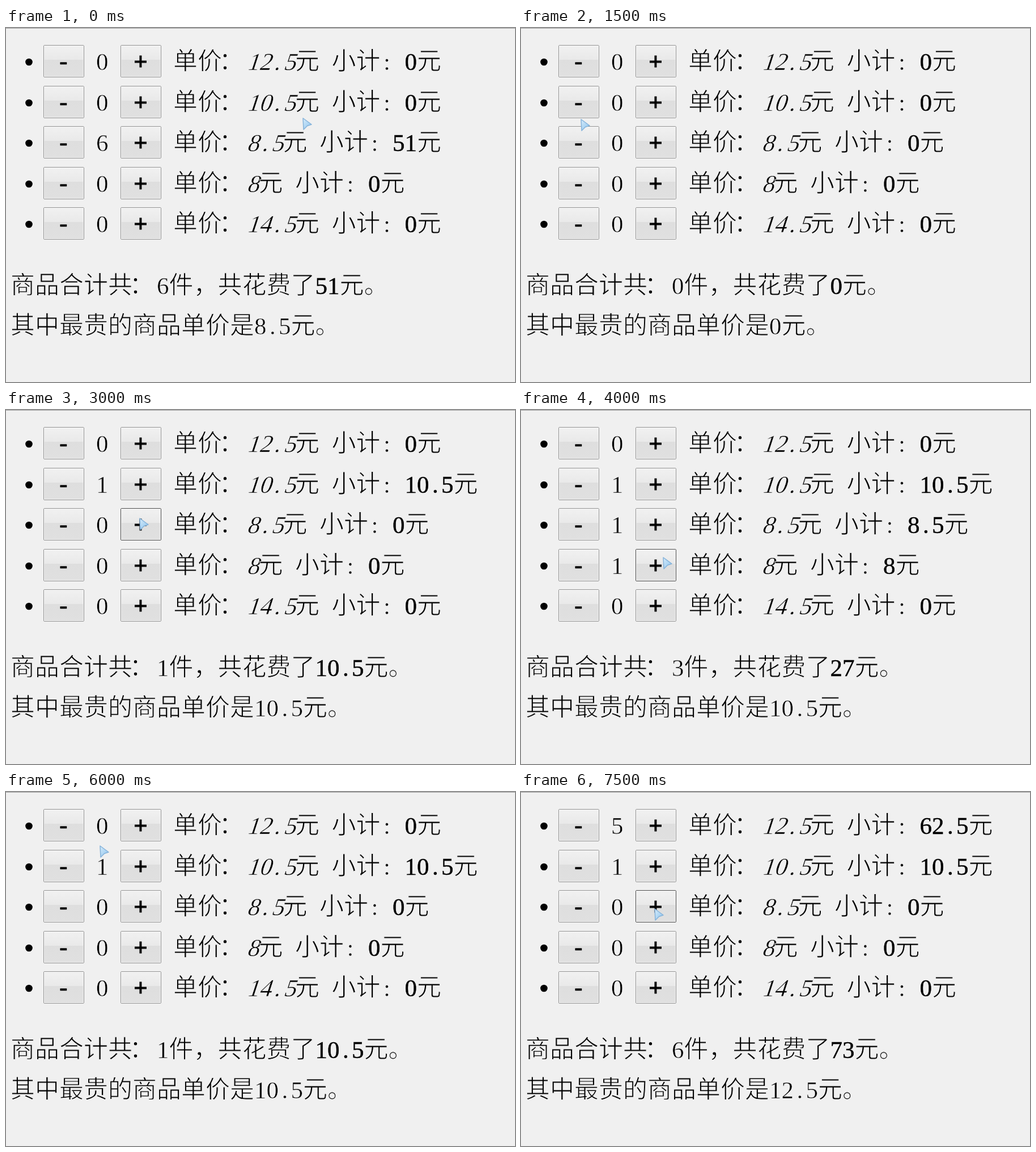
An HTML page for the animation above (8000 ms loop, 898 by 624 pixels).

```html
<!DOCTYPE html>
<html lang="zh-CN">
<head>
<meta charset="utf-8">
<style>
  html, body { margin: 0; width: 100%; height: 100%; overflow: hidden; background: #f0f0f0; }
  svg { display: block; width: 898px; height: 624px; }
  text { font: 43px "Liberation Serif", "Noto Sans CJK SC", "Noto Sans CJK", serif; white-space: pre; }
  /* a background-coloured outline thins the strokes */
  .latin { stroke: #f0f0f0; stroke-width: .6; }
  .han { stroke: #f0f0f0; stroke-width: 1.1; }
  .bold .latin { stroke: #000; stroke-width: .4; }
  .sign { font-family: "Liberation Sans", sans-serif; text-anchor: middle; stroke: #000; }
  .minus { font-size: 46px; stroke-width: .4; }
  .plus { font-size: 41px; stroke-width: 1; }
  .button { fill: url(#face); stroke: #939393; }
  .button.hover { stroke: #4c4c4c; }
</style>
</head>
<body>
<svg viewBox="0 0 898 624">
  <defs>
    <linearGradient id="face" x2="0" y2="1">
      <stop offset="0" stop-color="#f1f1f1"/>
      <stop offset=".46" stop-color="#e9e9e9"/>
      <stop offset=".46" stop-color="#dedede"/>
      <stop offset="1" stop-color="#e0e0e0"/>
    </linearGradient>
    <linearGradient id="glass" x2="1" y2="1">
      <stop offset="0" stop-color="#d5ebfa"/>
      <stop offset="1" stop-color="#8cc3ee"/>
    </linearGradient>
  </defs>
  <path d="M0 .5H898" stroke="#a0a0a0"/>
  <g id="fixed"></g>
  <g id="values"></g>
  <path id="cursor" d="M1 1L16 12L8.5 14.5L2 21Z" fill="url(#glass)" stroke="#86b3da" stroke-width="1.5" stroke-linejoin="round"/>
</svg>
<script>
const EM = 43, STEP = 500;
const prices = [12.5, 10.5, 8.5, 8, 14.5];

// quantities per row, then cursor tip
const steps = [
  ['00600', 523, 158], ['00600', 100, 55], ['00600', 104, 4], ['00000', 105, 160],
  ['00000', 105, 160], ['00000', 229, 152], ['01000', 235, 190], ['01100', 240, 252],
  ['01110', 250, 259], ['01111', 235, 338], ['01110', 90, 269], ['01100', 95, 200],
  ['01000', 165, 94], ['11000', 225, 55], ['31000', 225, 55], ['51000', 235, 205]
];

const $ = id => document.getElementById(id);
const fixed = $('fixed'), values = $('values'), cursor = $('cursor');
const rowTop = i => 30 + Math.round(71.6 * i);

function add(parent, tag, attrs, content = '') {
  const node = document.createElementNS('http://www.w3.org/2000/svg', tag);
  for (const key in attrs) node.setAttribute(key, attrs[key]);
  node.textContent = content;
  return parent.appendChild(node);
}

// Where punctuation sits inside its cell.
const nudge = { '.': EM / 8, ':': EM / 8, '：': -EM / 8 };

// Half-width cells for ASCII, full-width for the rest; returns the end position.
function write(parent, x, y, content, style = '') {
  const slant = style === 'slant' ? ' skewX(-18)' : '';
  const text = add(parent, 'text', { class: style, transform: `translate(${x} ${y})${slant}` });
  let end = 0;
  for (const run of String(content).match(/[ -~]+|[^ -~]+/g)) {
    const latin = run < '\u0080';
    const xs = [...run].map((char, i) => end + i * (latin ? EM / 2 : EM) + (nudge[char] || 0));
    add(text, 'tspan', { x: xs.join(' '), y: latin ? 0 : -1, class: latin ? 'latin' : 'han' }, run);
    end += run.length * (latin ? EM / 2 : EM);
  }
  return x + end;
}

// Pieces of [content, style] one after another.
function writeLine(parent, x, y, ...pieces) {
  for (const [content, style] of pieces) x = write(parent, x, y, content, style);
  return x;
}

const buttons = [];
const subtotalX = prices.map((price, i) => {
  const top = rowTop(i);
  add(fixed, 'circle', { cx: 40.5, cy: top + 30, r: 6.3 });
  for (const [x, sign, name, base] of [[66, '-', 'minus', 44.6], [202, '+', 'plus', 43]]) {
    const box = add(fixed, 'rect', { x: x + .5, y: top + .5, width: 71, height: 56, rx: 1.5, class: 'button' });
    add(fixed, 'rect', { x: x + 1.5, y: top + 1.5, width: 69, height: 54, fill: 'none', stroke: '#f8f8f8', 'stroke-opacity': .8 });
    add(fixed, 'text', { x: x + 35.5, y: top + base, class: 'sign ' + name }, sign);
    buttons.push({ box, x, top });
  }
  return writeLine(fixed, 295, top + 44, ['单价：'], [price, 'slant'], ['元 小计: ']);
});

function show([digits, x, y]) {
  const counts = [...digits].map(Number);
  const pieces = counts.reduce((a, b) => a + b);
  const cost = counts.reduce((sum, n, i) => sum + n * prices[i], 0);
  const dearest = Math.max(0, ...prices.filter((_, i) => counts[i]));

  values.replaceChildren();
  counts.forEach((n, i) => {
    const base = rowTop(i) + 44;
    write(values, 159, base, n);
    writeLine(values, subtotalX[i], base, [n * prices[i], 'bold'], ['元']);
  });
  writeLine(values, 8, 469, [`商品合计共：${pieces}件，共花费了`], [cost, 'bold'], ['元。']);
  write(values, 8, 540, `其中最贵的商品单价是${dearest}元。`);

  for (const b of buttons) {
    const over = x >= b.x && x < b.x + 72 && y >= b.top && y < b.top + 57;
    b.box.classList.toggle('hover', over);
  }
  cursor.setAttribute('transform', `translate(${x} ${y})`);
}

let shown = -1;
const start = performance.now();
function tick(now) {
  const index = Math.floor(Math.max(0, now - start) / STEP) % steps.length;
  if (index !== shown) show(steps[shown = index]);
  requestAnimationFrame(tick);
}
tick(start);
</script>
</body>
</html>
```
